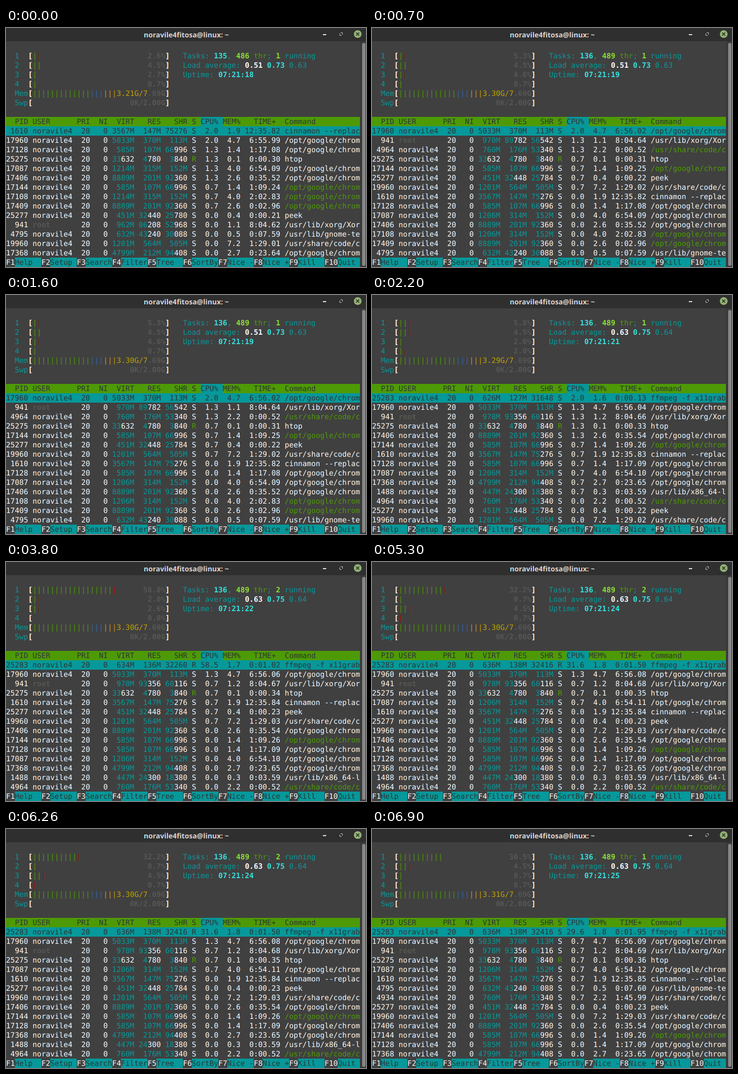
These frames come from a looping animation (651x433 px, 8 s). An HTML page with a canvas:

```html
<!DOCTYPE html>
<html lang="en">
<head>
<meta charset="utf-8">
<title>Process viewer</title>
<style>
html, body { margin: 0; width: 651px; height: 433px; overflow: hidden; background: #404040; }
canvas { display: block; }
</style>
</head>
<body>
<canvas id="stage" width="651" height="433"></canvas>
<script>
const W = 651, H = 433, CELL = 8, LINE = 17, TOP = 42;
const LOOP = 8000, UPDATES = 6;
const SAMPLE = 1.521; // seconds of process time per update
const TOTAL_MB = 7.69 * 1024;
const MONO = '13.333px "DejaVu Sans Mono", monospace';
const C = {
  bg: '#404040', white: '#ffffff', black: '#2e3436', shadow: '#555753',
  cyan: '#06989a', aqua: '#34e2e2', green: '#4e9a06', lime: '#8ae234',
  red: '#cc0000', blue: '#3465a4', yellow: '#c4a000'
};
const USER = 'noravile4';
const CHROME = '/opt/google/chrom', CODE = '/usr/share/code/c';

const stage = document.getElementById('stage').getContext('2d', { alpha: false });
const page = document.createElement('canvas');
page.width = W;
page.height = H;
const ctx = page.getContext('2d', { alpha: false });
ctx.textRendering = 'geometricPrecision';
let textShift = 0;

// Memory of each program: virtual, resident, shared.
// "grow" is added over two updates, eased out with "power".
const apps = {
  desktop: { command: 'cinnamon --replac', sizes: '3567M 147M 75276' },
  browser: { command: CHROME, sizes: '5033M 370M 113M' },
  gpu: { command: CHROME, sizes: '585M 107M 66996' },
  htop: { command: 'htop', sizes: '33632 4780 3840' },
  tabA: { command: CHROME, sizes: '1214M 315M 152M', grow: [-8, -1, 0], power: 9 },
  tabB: { command: CHROME, sizes: '8889M 201M 92360' },
  tabC: { command: CHROME, sizes: '4799M 212M 94408' },
  peek: { command: 'peek', sizes: '451M 32440 25780', grow: [0, 8, 4], power: 9 },
  xorg: { command: '/usr/lib/xorg/Xor', sizes: '962M 86208 52968', grow: [16, 7148, 7148], power: 1, user: 'root' },
  terminal: { command: '/usr/lib/gnome-te', sizes: '632M 43240 30088' },
  editor: { command: CODE, sizes: '1201M 564M 505M' },
  helper: { command: CODE, sizes: '760M 176M 53340' },
  session: { command: '/usr/lib/x86_64-l', sizes: '447M 24300 18380' },
  ffmpeg: { command: 'ffmpeg -f x11grab', sizes: '626M 127M 31648', grow: [10, 11, 768], power: 2.3, born: 2 }
};

function task(pid, app, start, ticks, thread = false) {
  const [min, sec] = start.split(':');
  return { pid: String(pid), app: apps[app], time: min * 6000 + Math.round(sec * 100), ticks: [...ticks].map(Number), thread };
}

// CPU ticks used in each update drive the load, the clock and the order.
const tasks = [
  task(1610, 'desktop', '12:35.82', '301101'),
  task(17960, 'browser', '6:55.99', '332221'),
  task(17128, 'gpu', '1:17.08', '201000'),
  task(25275, 'htop', '0:00.30', '212111'),
  task(17087, 'tabA', '6:54.09', '201011'),
  task(17406, 'tabB', '0:35.52', '202000'),
  task(17144, 'gpu', '1:09.24', '111000', true),
  task(17108, 'tabA', '2:02.83', '100000', true),
  task(17409, 'tabB', '0:02.96', '100000', true),
  task(25277, 'peek', '0:00.21', '010100'),
  task(941, 'xorg', '8:04.62', '022111'),
  task(4795, 'terminal', '0:07.59', '000001'),
  task(19960, 'editor', '1:29.01', '010100'),
  task(17368, 'tabC', '0:23.64', '001000'),
  task(4964, 'helper', '0:00.50', '020000', true),
  task(1488, 'session', '0:03.58', '001000'),
  task(4934, 'helper', '1:45.98', '000001'),
  task(25283, 'ffmpeg', '0:00.10', [0, 0, 3, 89, 48, 45])
];

// Percent, then bars: g = user, r = system.
const G10 = 'g'.repeat(10);
const meters = [
  '3.21|2.6 gr|4.5 gg|2.7 g|0.7 g',
  '3.30|5.3 gr|4.5 gg|4.6 gr|0.7 g',
  '3.29|5.8 ggr|4.5 ggr|2.0 g|2.0 gr',
  `3.30|58.8 ${G10}ggggggggr|2.0 gr|2.6 gr|0.0 `,
  `3.30|32.2 ${G10}r|0.7 g|4.5 ggr|0.7 r`,
  `3.31|30.5 ${G10}|4.5 ggr|0.7 g|0.7 g`
];

function formatTime(cs) {
  const sec = (cs % 6000 / 100).toFixed(2).padStart(5, '0');
  return Math.floor(cs / 6000) + ':' + sec;
}

function sizesAt(app, n) {
  const part = Math.min(1, (n - (app.born || 0)) / 2);
  const eased = 1 - (1 - part) ** (app.power || 1);
  return app.sizes.split(' ').map((size, i) => {
    const added = app.grow ? app.grow[i] * eased : 0;
    return Math.round(parseInt(size) + added) + (size.endsWith('M') ? 'M' : '');
  });
}

function describe(t, n) {
  const sizes = sizesAt(t.app, n);
  const resident = parseInt(sizes[1]) / (sizes[1].endsWith('M') ? 1 : 1024);
  const busy = t.app === apps.htop || t.ticks[n] > 45;
  const used = t.ticks.slice(1, n + 1).reduce((a, b) => a + b, 0);
  return {
    pid: t.pid, user: t.app.user || USER, sizes, thread: t.thread, command: t.app.command,
    state: busy ? 'R' : 'S',
    cpu: (t.ticks[n] / SAMPLE).toFixed(1),
    mem: (resident / TOTAL_MB * 100).toFixed(1),
    time: formatTime(t.time + used)
  };
}

// A stable sort by load keeps the previous order of equal tasks.
function buildScreens() {
  let order = [];
  return meters.map((line, n) => {
    const fresh = tasks.filter(t => (t.app.born || 0) === n);
    order = [...fresh, ...order].sort((a, b) => b.ticks[n] - a.ticks[n]);
    const [used, ...cpus] = line.split('|');
    return { n, used, cpus, rows: order.slice(0, 14).map(t => describe(t, n)) };
  });
}

function box(x, y, w, h, color) {
  ctx.fillStyle = color;
  ctx.fillRect(x, y, w, h);
}

function band(col, row, cols, color) {
  box(col * CELL, TOP + row * LINE, cols * CELL, LINE, color);
}

// Writes on the character grid and returns the next free column.
function put(col, row, text, color, bold) {
  ctx.font = (bold ? 'bold ' : '') + MONO;
  ctx.fillStyle = color;
  for (const ch of text) {
    if (ch !== ' ') ctx.fillText(ch, col * CELL + textShift, TOP + row * LINE + 13);
    col++;
  }
  return col;
}

// Each run is [text, color, bold].
function putRuns(col, row, runs) {
  for (const run of runs) col = put(col, row, ...run);
}

function stroke(color, width, ...lines) {
  ctx.strokeStyle = color;
  ctx.lineWidth = width;
  ctx.beginPath();
  for (const [x, y, ...rest] of lines) {
    ctx.moveTo(x, y);
    for (let i = 0; i < rest.length; i += 2) ctx.lineTo(rest[i], rest[i + 1]);
  }
  ctx.stroke();
}

function drawWindow() {
  box(0, 0, W, H, C.bg);
  box(0, 0, W, 24, '#2f2f2f');
  ctx.font = '600 12.8px "Noto Sans", sans-serif';
  ctx.fillStyle = '#dadada';
  ctx.textAlign = 'center';
  ctx.fillText(USER + 'fitosa@linux: ~', 326 + textShift, 17);
  ctx.textAlign = 'left';

  box(573, 11, 6, 2, '#dadada');
  stroke('#b8b8b8', 1, [605, 8.5, 608.5, 8.5, 608.5, 12], [603.5, 10, 603.5, 13.5, 607, 13.5]);
  ctx.fillStyle = '#92b372';
  ctx.beginPath();
  ctx.arc(636, 11, 7, 0, Math.PI * 2);
  ctx.fill();
  stroke('#2f2f2f', 1.6, [633.3, 8.3, 638.7, 13.7], [638.7, 8.3, 633.3, 13.7]);

  box(640, 24, 11, H - 24, '#3a3a3a');
  ctx.fillStyle = '#868686';
  ctx.beginPath();
  ctx.roundRect(644, 27, 6, 404, 3);
  ctx.fill();
}

function drawMeter(row, label, bars, value) {
  put(2, row, label, C.cyan);
  put(5, row, '[', C.white, true);
  putRuns(6, row, bars);
  put(36 - value.length, row, value, C.shadow, true);
  put(36, row, ']', C.white, true);
}

function drawSummary({ n, used, cpus, rows }) {
  cpus.forEach((cpu, i) => {
    const [percent, bars] = cpu.split(' ');
    drawMeter(i, String(i + 1), [...bars].map(b => ['|', b === 'g' ? C.green : C.red]), percent + '%');
  });
  drawMeter(4, 'Mem', [
    ['|'.repeat(13), C.green], ['|||', C.blue], ['|||', C.yellow], [used + 'G/7', C.yellow]
  ], '.69G');
  drawMeter(5, 'Swp', [], '0K/2.00G');

  const [count, threads] = n ? ['136', '489'] : ['135', '486'];
  const [one, five, fifteen] = (n < 2 ? '0.51 0.73 0.63' : '0.63 0.75 0.64').split(' ');
  const running = String(rows.filter(p => p.state === 'R').length);
  putRuns(40, 0, [
    ['Tasks: ', C.cyan], [count, C.aqua, true], [', ', C.cyan], [threads, C.lime, true],
    [' thr', C.green], ['; ', C.cyan], [running, C.lime, true], [' running', C.cyan]
  ]);
  putRuns(40, 1, [
    ['Load average: ', C.cyan], [one + ' ', C.white, true], [five + ' ', C.aqua, true], [fifteen, C.cyan]
  ]);
  putRuns(40, 2, [['Uptime: ', C.cyan], ['07:21:' + Math.floor(18 + SAMPLE * n), C.aqua, true]]);
}

function putSize(col, row, size, ink) {
  const cut = size.endsWith('M') ? size.length : size.length - 3;
  putRuns(col - size.length, row, [[size.slice(0, cut), ink || C.cyan], [size.slice(cut), ink || C.white]]);
}

function drawProcess(p, row, selected) {
  const ink = selected && C.black;
  const base = ink || C.white;
  const right = (col, text) => put(col - text.length, row, text, base);
  if (selected) band(0, row, 80, C.cyan);
  right(5, p.pid);
  const root = p.user === 'root';
  put(6, row, p.user, root ? C.shadow : base, root);
  right(19, '20');
  right(23, '0');
  p.sizes.forEach((size, i) => putSize(29 + i * 6, row, size, ink));
  put(42, row, p.state, !selected && p.state === 'R' ? C.green : base);
  right(48, p.cpu);
  right(53, p.mem);
  right(62, p.time);
  put(63, row, p.command, !selected && p.thread ? C.green : base);
}

function drawTable(rows) {
  band(0, 7, 80, C.green);
  band(44, 7, 5, C.cyan);
  put(0, 7, '  PID USER      PRI  NI  VIRT   RES   SHR S CPU% MEM%   TIME+  Command', C.black);
  rows.forEach((p, i) => drawProcess(p, 8 + i, i === 0));
}

function drawKeys() {
  const labels = ['Help', 'Setup', 'Search', 'Filter', 'Tree', 'SortBy', 'Nice -', 'Nice +', 'Kill', 'Quit'];
  labels.forEach((label, i) => {
    const next = put(i * 8, 22, 'F' + (i + 1), C.white);
    band(next, 22, i * 8 + 8 - next, C.cyan);
    put(next, 22, label, C.black);
  });
}

// Subpixel text: each colour channel is drawn a third of a pixel apart.
function render(screen) {
  stage.globalCompositeOperation = 'source-over';
  stage.fillStyle = '#000';
  stage.fillRect(0, 0, W, H);
  stage.globalCompositeOperation = 'lighter';
  ['#f00', '#0f0', '#00f'].forEach((channel, i) => {
    textShift = (1 - i) / 3;
    drawWindow();
    drawSummary(screen);
    drawTable(screen.rows);
    drawKeys();
    ctx.globalCompositeOperation = 'multiply';
    box(0, 0, W, H, channel);
    ctx.globalCompositeOperation = 'source-over';
    stage.drawImage(page, 0, 0);
  });
}

// The first change comes at 700 ms, the others about 1550 ms apart.
const startOf = n => n ? Math.floor(7 + 15.5 * (n - 1)) * 100 : 0;

const screens = buildScreens();
const start = performance.now();
let shown = -1;

function tick(now) {
  const t = Math.max(0, now - start) % LOOP;
  let n = UPDATES - 1;
  while (startOf(n) > t) n--;
  if (n !== shown) {
    shown = n;
    render(screens[n]);
  }
  requestAnimationFrame(tick);
}
tick(start);
</script>
</body>
</html>
```
